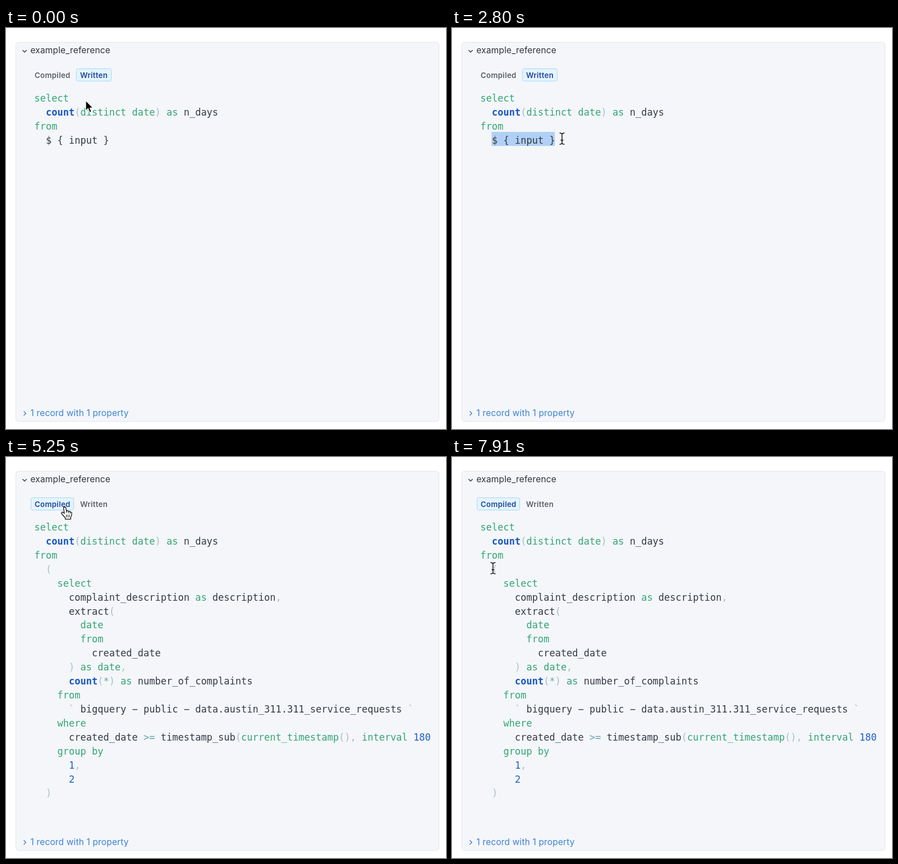
Recreate the animation shown at these times as an HTML page. Size 784x714 px, loop 8 s.

```html
<!DOCTYPE html>
<html lang="en">
<head>
<meta charset="utf-8">
<title>SQL reference</title>
<style>
  html, body { margin: 0; width: 100%; height: 100%; overflow: hidden; background: #fff; }
  svg { display: block; width: 784px; height: 714px; }
  text { white-space: pre; }
  .ui { font: 15.5px Inter, sans-serif; letter-spacing: .15px; }
  .tab { font: 600 13.3px Inter, sans-serif; letter-spacing: .3px; }
  .code { font: 17px "DejaVu Sans Mono", monospace; }
  .word { fill: #363b44; }
  .key { fill: #35a572; }
  .fn { fill: #1757c2; font-weight: 700; }
  .num { fill: #1f5fc4; }
  .punct { fill: #a9bfc4; }
  .op { fill: #68a8a4; }
  .line { fill: none; stroke-width: 1.4; stroke-linecap: round; stroke-linejoin: round; }
</style>
</head>
<body>
<svg viewBox="0 0 784 714">
  <defs><clipPath id="clip"><rect x="40" y="105" width="716" height="560"/></clipPath></defs>
  <rect x="17.5" y="25.5" width="754" height="675" rx="5" fill="#f4f6fa" stroke="#e1e5ec"/>
  <path class="line" d="M29.8 39.8l3.3 3.3 3.3-3.3" stroke="#33363d"/>
  <text class="ui" x="43.5" y="45" fill="#30333a">example_reference</text>
  <path class="line" d="M32 682.8l3.4 3.4-3.4 3.4" stroke="#3d82d2"/>
  <text class="ui" x="43.5" y="691" fill="#3d82d2">1 record with 1 property</text>

  <rect id="boxC" x="44.5" y="72.5" width="76" height="22" rx="3"/>
  <rect id="boxW" x="125.5" y="72.5" width="62" height="22" rx="3"/>
  <text class="tab" id="tabC" x="51" y="88.6">Compiled</text>
  <text class="tab" id="tabW" x="132" y="88.6">Written</text>

  <rect id="sel" x="70.5" y="185" height="25" fill="#b0d0f6"/>
  <g class="code" id="written" clip-path="url(#clip)"></g>
  <g class="code" id="compiled" clip-path="url(#clip)"></g>

  <g id="arrow">
    <path d="M0 0V18.6L4.3 14.6 7.2 21.4 10.5 20 7.6 13.4H13.2Z" fill="#000" stroke="#fff" stroke-width="1.3" stroke-linejoin="round"/>
  </g>
  <g id="beam" fill="none" stroke-linecap="round">
    <defs><path id="beamShape" d="M-4-10Q-.5-10 0-7.8Q.5-10 4-10M0-7.8V7.8M-4 10Q-.5 10 0 7.8Q.5 10 4 10M-2 2.8H2"/></defs>
    <use href="#beamShape" stroke="#fff" stroke-width="3.4"/>
    <use href="#beamShape" stroke="#111" stroke-width="1.5"/>
  </g>
  <g id="hand" stroke="#111" stroke-width="1.3" stroke-linejoin="round" stroke-linecap="round">
    <path d="M-2.4 2.2C-2.7-.4 1-.9 1.6 1.7L2.8 7.6C3.4 6.2 6 6.3 6.3 8.2C7.2 7 9.3 7.5 9.4 9.2C10.6 8.5 12.2 9.3 12.2 11C12.3 15 11.6 16.5 10.3 18.6V21.6H.6V19.3C-1.6 17.4-3.2 14.6-5.6 12.3C-7.4 10.3-4.8 8.2-2.9 10L-1 11.6Z" fill="#fff"/>
    <path d="M2.8 7.6L3.2 10.4M6.3 8.2L6.5 10.8M9.4 9.2V11.4M2.5 14V18.2M5.2 14V18.2M7.9 14V18.2" fill="none" stroke-width="1"/>
  </g>
</svg>
<script>
const LOOP = 8000, COL = 10.234, ROW = 24.92, LEFT = 50.6, TOP = 131;
const SELECT_FROM = 1560, DESELECT = 3430, SWITCH = 4970;
const $ = id => document.getElementById(id);

const head = `select
  count(distinct date) as n_days
from
`;
const writtenSql = head + '  $ { input }';
const compiledSql = head + `  (
    select
      complaint_description as description,
      extract(
        date
        from
          created_date
      ) as date,
      count(*) as number_of_complaints
    from
      \` bigquery − public − data.austin_311.311_service_requests \`
    where
      created_date >= timestamp_sub(current_timestamp(), interval 180 day)
    group by
      1,
      2
  )`;

const keywords = new Set('select distinct date as from where current_timestamp interval day group by'.split(' '));

function kind(s) {
  if (s === 'count') return 'fn';
  if (keywords.has(s)) return 'key';
  if (/^\d+$/.test(s)) return 'num';
  if (/^[(),`]$/.test(s)) return 'punct';
  return /^(>=|\*)$/.test(s) ? 'op' : 'word';
}

function drawCode(group, sql) {
  sql.split('\n').forEach((line, row) => {
    for (const m of line.matchAll(/[\w.]+|>=|\S/g)) {
      const el = document.createElementNS('http://www.w3.org/2000/svg', 'text');
      el.setAttribute('class', kind(m[0]));
      el.setAttribute('x', LEFT + m.index * COL);
      el.setAttribute('y', TOP + row * ROW);
      el.textContent = m[0];
      group.append(el);
    }
  });
}

// Pointer stops: time, x, y
const stops = [
  [0, 142, 129], [490, 82, 192], [770, 82, 192], [1400, 72, 200], [1560, 72, 200],
  [1750, 100, 200], [2120, 140, 199], [2660, 196, 197], [3430, 196, 197], [4060, 105, 89],
  [6230, 105, 89], [6790, 68, 165.5], [7490, 73, 198], [LOOP, 73, 198]
];

function pointer(t) {
  const i = stops.findIndex(s => s[0] > t);
  const [t0, x0, y0] = stops[i - 1], [t1, x1, y1] = stops[i];
  const u = (t - t0) / (t1 - t0), e = u * u * (3 - 2 * u);
  return [x0 + (x1 - x0) * e, y0 + (y1 - y0) * e];
}

const looks = {
  active: ['#e4f4fe', '#a4d9f8', '#1d479a'],
  hover: ['#f3f4f7', '#c3c7cf', '#50545b'],
  idle: ['none', 'none', '#5c6067']
};

function setTab(name, look) {
  const [fill, stroke, ink] = looks[look];
  $('box' + name).setAttribute('fill', fill);
  $('box' + name).setAttribute('stroke', stroke);
  $('tab' + name).setAttribute('fill', ink);
}

const show = (id, on) => $(id).setAttribute('visibility', on ? 'visible' : 'hidden');

function render(t) {
  const [x, y] = pointer(t);
  const done = t >= SWITCH;
  const over = x > 45 && x < 121 && y > 72 && y < 95;
  const cursor = over ? 'hand' : t < 70 || y < 112 ? 'arrow' : 'beam';
  for (const id of ['hand', 'arrow', 'beam']) show(id, id === cursor);
  $(cursor).setAttribute('transform', `translate(${x} ${y})`);

  setTab('C', done ? 'active' : over ? 'hover' : 'idle');
  setTab('W', done ? 'idle' : 'active');
  show('written', !done);
  show('compiled', done);

  const dragging = t >= SELECT_FROM && t < DESELECT;
  const cols = Math.max(0, Math.min(11, Math.floor((x - 71) / COL + .1)));
  $('sel').setAttribute('width', dragging ? cols * COL : 0);
}

drawCode($('written'), writtenSql);
drawCode($('compiled'), compiledSql);

const start = performance.now();
function tick() {
  render(Math.max(0, performance.now() - start) % LOOP);
  requestAnimationFrame(tick);
}
tick();
</script>
</body>
</html>
```
